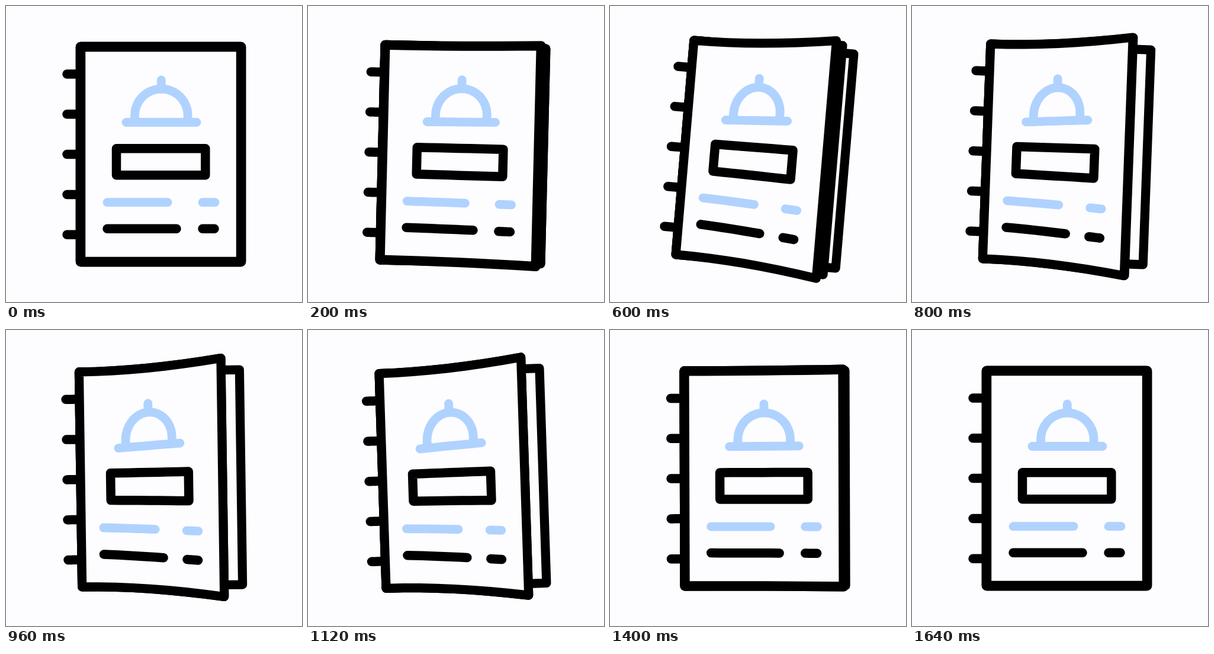
Recreate the animation shown at these times as an HTML page. Size 500x500 px, loop 1720 ms.

```html
<!DOCTYPE html>
<html lang="en">
<head>
<meta charset="utf-8">
<title>Menu book</title>
<style>
  html, body { margin: 0; width: 100%; height: 100%; overflow: hidden; background: #fdfdff; }
  svg { display: block; width: 100vw; height: 100vh; }
  path { fill: none; stroke: #000; stroke-width: 15.5; stroke-linecap: round; stroke-linejoin: round; }
  .sheet { fill: #fdfdff; }
  .blue { stroke: #b0d2ff; stroke-width: 14.8; }
</style>
</head>
<body>
<svg viewBox="0 0 500 500">
  <path id="back" class="sheet"/>
  <path id="middle" class="sheet"/>
  <path id="tabs"/>
  <path id="cover" class="sheet"/>
  <path id="dome" class="blue"/>
  <path id="box"/>
  <path id="row1" class="blue"/>
  <path id="row2"/>
</svg>
<script>
const LOOP = 1720, STEP = 40, END = 1640;
const LEFT = 126, RIGHT = 397, TOP = 69, BOTTOM = 432;
const CX = (LEFT + RIGHT) / 2, CY = (TOP + BOTTOM) / 2;

const mix = (a, b, k) => a + (b - a) * k;
const part = (from, to, t) => Math.min(1, Math.max(0, (t - from) / (to - from)));
const sine = k => (1 - Math.cos(Math.PI * k)) / 2;
const ease = (from, to, t) => sine(part(from, to, t));

// The book rocks right, then left, and settles while its pages close
function pose(t) {
  const settle = sine(1 - (1 - part(1100, END, t)) ** 2);
  return {
    angle: (4.95 * ease(0, 560, t) - 6.85 * ease(560, 1100, t) + 1.9 * settle) * Math.PI / 180,
    cover: ease(0, 600, t) * (1 - settle),
    middle: ease(220, 860, t) * (1 - settle)
  };
}

// How a raised page moves its points vertically; u runs from spine to edge
const curl = (u, y) => .11 * y * u * u;
const spread = (u, y) => .14 * y * u ** 1.4;
const tilt = u => 16 * (.41 - u);

// Flat page point to the stage
function bender(angle, open, lift) {
  const c = Math.cos(angle), s = Math.sin(angle), w = RIGHT - LEFT;
  return ([x, y]) => {
    const u = (x - LEFT) / w;
    const dx = LEFT + w * u * (1 - open * (.165 - .05 * u * u)) - CX;
    const dy = y - CY + open * lift(u, y - CY);
    return [CX + dx * c - dy * s, CY + dx * s + dy * c];
  };
}

// Cut straight runs into short pieces so that they can bend
function line(...pts) {
  const out = [pts[0]], n = 8;
  for (let i = 1; i < pts.length; i++) {
    for (let j = 1; j <= n; j++) {
      out.push([0, 1].map(c => mix(pts[i - 1][c], pts[i][c], j / n)));
    }
  }
  return out;
}
const row = (y, x1, x2) => line([x1, y], [x2, y]);
const rect = (x1, y1, x2, y2) => line([x1, y1], [x2, y1], [x2, y2], [x1, y2], [x1, y1]);
const arc = (x, y, r) => Array.from({ length: 25 }, (_, i) => {
  const a = Math.PI * (1 + i / 24);
  return [x + r * Math.cos(a), y + r * Math.sin(a)];
});

const sheet = [rect(LEFT, TOP, RIGHT, BOTTOM)];
const tabs = Array.from({ length: 5 }, (_, i) => row(115 + 67.8 * i, 103, LEFT));
const dome = [
  row(196.5, 203, 322),
  [[217.5, 194], ...arc(262.3, 184.8, 44.8), [307, 194]],
  line([262.3, 140], [262.3, 125])
];
const box = [rect(186.5, 240.7, 336.8, 285.8)];
const row1 = [row(331.7, 171, 273), row(331.7, 332, 353)];
const row2 = [row(376.2, 171, 288), row(376.2, 332, 352)];

function draw(id, runs, bend, weight) {
  const el = document.getElementById(id);
  const closed = runs === sheet || runs === box ? 'Z' : '';
  el.setAttribute('d', runs.map(run =>
    'M' + run.map(p => bend(p).map(n => n.toFixed(2)).join(' ')).join('L') + closed).join(''));
  if (weight) el.style.strokeWidth = weight;
}

function render() {
  const now = performance.now() % LOOP;
  const { angle, cover, middle } = pose(Math.min(END, Math.floor(now / STEP) * STEP));
  const weight = 16.4 - 1.2 * cover;
  const flat = bender(angle, 0, curl);
  const print = bender(angle, cover, spread);

  draw('back', sheet, flat, weight);
  draw('middle', sheet, bender(angle, middle, curl), weight);
  draw('tabs', tabs, flat);
  draw('cover', sheet, bender(angle, cover, curl), weight);
  draw('dome', dome, bender(angle, cover, tilt));
  draw('box', box, print);
  draw('row1', row1, print);
  draw('row2', row2, print);
  requestAnimationFrame(render);
}
render();
</script>
</body>
</html>
```
